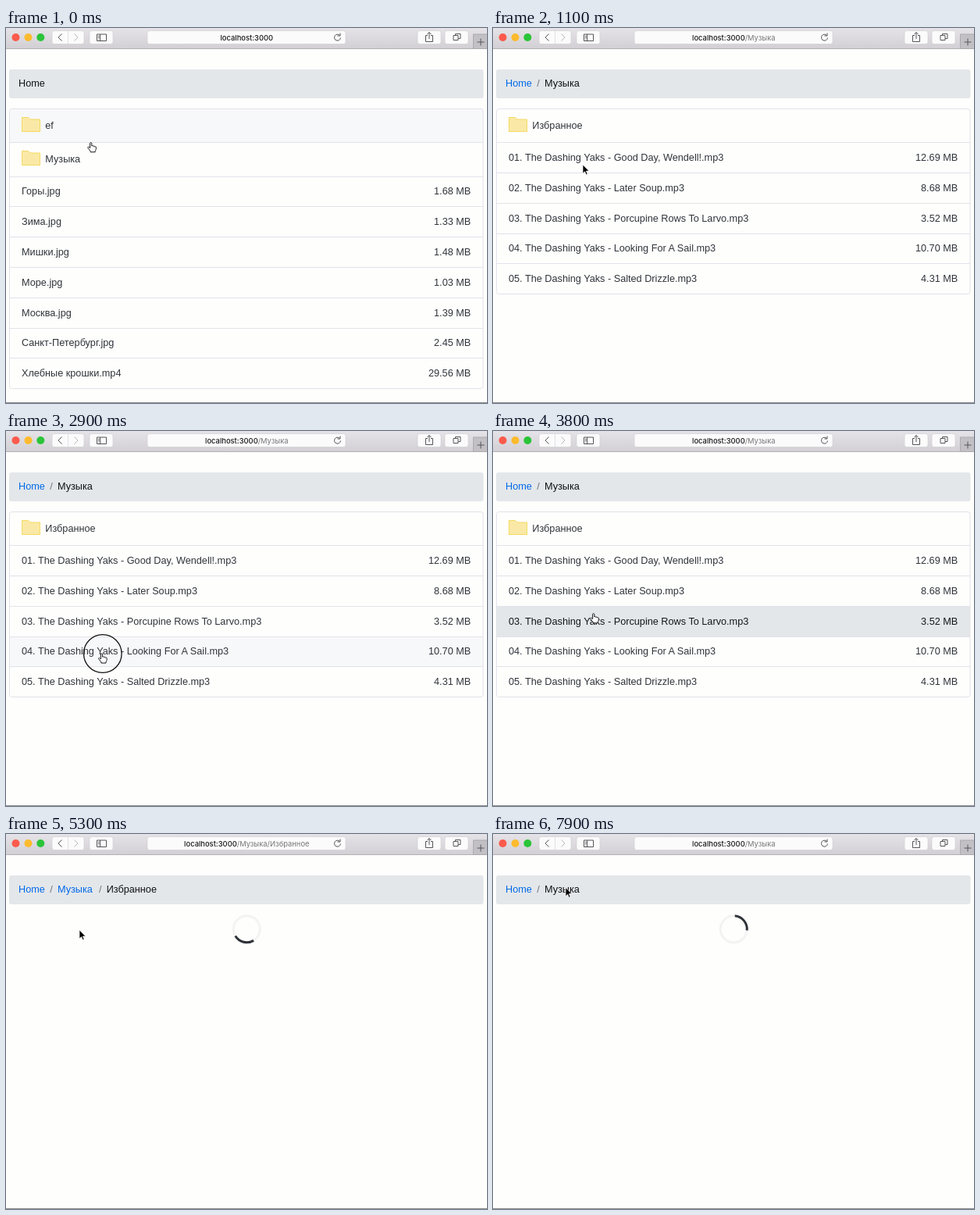
An HTML page for the animation above (8000 ms loop, 616 px wide and 480 px high).

```html
<!DOCTYPE html>
<html lang="ru">
<head>
<meta charset="utf-8">
<title>File browser</title>
<style>
  html, body { margin: 0; width: 100%; height: 100%; overflow: hidden; background: #fefefd; }
  svg { display: block; width: 616px; height: 480px; }
  text { font: 12.7px "Liberation Sans", Arial, sans-serif; fill: #30343a; white-space: pre; }
  .url { font: 500 9.4px Inter, Roboto, sans-serif; fill: #18181a; text-anchor: middle; }
  .url .path { fill: #77777a; font-weight: 400; }
  .size { text-anchor: end; }
  .link { fill: #0069e8; }
  .here { fill: #101214; }
  .slash { fill: #6c757d; }
  .active text { fill: #14171a; }
  .btn { fill: #fbfbfb; stroke: #cfcdd1; stroke-width: .6; }
  .icon { fill: none; stroke: #555558; stroke-width: 1; }
  .line { fill: none; stroke: #e2e2ea; }
  .folder { fill: #fae9a6; stroke: #f4d963; }
</style>
</head>
<body>
<svg viewBox="0 0 616 480">
  <defs>
    <linearGradient id="bar" x2="0" y2="1">
      <stop stop-color="#e5e3e7"/><stop offset="1" stop-color="#d2d0d4"/>
    </linearGradient>
  </defs>
  <rect width="616" height="480" fill="#fefefd"/>
  <rect width="616" height="26" fill="url(#bar)"/>
  <path d="M0 26.5H616" stroke="#b4b2b6"/>
  <path d="M0 479.5H616" stroke="#8b8b8d"/>
  <circle cx="12.5" cy="12" r="5" fill="#fb5a4c"/>
  <circle cx="28.5" cy="12" r="5" fill="#fcbb2e"/>
  <circle cx="44.3" cy="12" r="5" fill="#2bc438"/>
  <g class="btn">
    <rect x="59" y="3.5" width="41" height="17" rx="3"/>
    <rect x="107" y="3.5" width="30" height="17" rx="3"/>
    <rect x="181" y="3.5" width="254" height="17" rx="3"/>
    <rect x="527" y="3.5" width="30" height="17" rx="3"/>
    <rect x="562" y="3.5" width="30" height="17" rx="3"/>
    <path d="M79.5 4V20"/>
  </g>
  <g class="icon">
    <path d="M71.5 7.5l-4.5 4.5 4.5 4.5"/>
    <path d="M87.5 7.5l4.5 4.5-4.5 4.5" stroke="#b8b8ba"/>
    <path d="M116.5 8H128.5V16.5H116.5ZM120.5 8V16.5M118 10.5h1.5M118 12.5h1.5"/>
    <path d="M427.5 9.5A4 4 0 1 0 428.5 12.5M428 6.5V10H424.5"/>
    <path d="M540 9.5H537.5V17.5H546.5V9.5H544M542 14V5.5M539.5 8L542 5.5L544.5 8"/>
    <path d="M573 14.5V9.5H579V15.5H573ZM575.5 9.5V7.5H582V13.5H579"/>
  </g>
  <rect x="598.5" y="8" width="18" height="18.5" fill="#c2c0c4" stroke="#adabaf"/>
  <path d="M603.5 18H612.5M608 13.5V22.5" stroke="#555558"/>
  <rect x="4" y="53" width="607.5" height="37" rx="3" fill="#e4e7ea"/>
  <g id="pages"></g>
  <g id="spinner" fill="none" stroke-width="3">
    <circle r="17" stroke="#f3f3f3"/>
    <path d="M-12.02 -12.02A17 17 0 0 1 12.02 -12.02" stroke="#2e3338"/>
  </g>
  <circle id="ring" r="24.3" fill="none" stroke="#111" stroke-width="1.3"/>
  <path id="arrow" d="M0 0V11.2L2.6 8.8L4.3 12.7L6.1 11.9L4.4 8.1H8Z"
        fill="#000" stroke="#fff" stroke-width=".7"/>
  <path id="hand" d="M-1.4 .9C-1.4 -.6 .8 -.6 .8 .9V4.2C1.2 3.4 2.7 3.6 2.8 4.7C3.3 4 4.6 4.2 4.7 5.3C5.3 4.7 6.4 5 6.4 6.1C6.4 8.6 6.1 9.1 5.2 10.7V12H-.9V10.9C-2 9.6 -2.6 8.3 -4 6.9C-4.9 5.9 -3.5 4.9 -2.6 5.7L-1.4 6.9Z"
        fill="#fff" stroke="#151517"/>
</svg>
<script>
const LOOP = 8000, STEP = 100, FOLDER_H = 43.4, FILE_H = 38.8, TOP = 103.8;
const $ = id => document.getElementById(id);

function add(parent, tag, attrs = {}, text = '') {
  const el = document.createElementNS('http://www.w3.org/2000/svg', tag);
  for (const k in attrs) el.setAttribute(k, attrs[k]);
  el.textContent = text;
  return parent.appendChild(el);
}
const show = (el, on) => { el.style.display = on ? '' : 'none'; };

// crumbs: [x, label]
function makePage(crumbs, folders = [], files = []) {
  const root = add($('pages'), 'g'), list = add(root, 'g'), rows = [];
  const url = add(root, 'text', { class: 'url', x: 308.3, y: 15.6 });
  add(url, 'tspan', {}, 'localhost:3000');
  const path = crumbs.slice(1).map(c => '/' + c[1]).join('');
  if (path) add(url, 'tspan', { class: 'path' }, path);

  const labels = crumbs.map(([x, name], i) => {
    if (i) add(root, 'text', { class: 'slash', x: x - 9.8, y: 75 }, '/');
    const last = i === crumbs.length - 1;
    return add(root, 'text', { class: last ? 'here' : 'link', x, y: 75 }, name);
  });

  let y = TOP;
  function row(name, h, size) {
    const group = add(list, 'g');
    const bg = add(group, 'rect', { x: 4.5, y, width: 606.5, height: h });
    const base = Math.floor(y + h / 2 + 3.8);
    add(group, 'text', { x: size ? 20 : 50.3, y: base }, name);
    if (size) add(group, 'text', { class: 'size', x: 595.3, y: base }, size);
    else add(group, 'path', {
      class: 'folder',
      d: `M20.5 ${base - .5}V${base - 14.5}H28.5L31 ${base - 12}H43.5V${base + 3.5}H20.5Z`
    });
    if (y > TOP) add(group, 'path', { class: 'line', d: `M4.5 ${Math.round(y) - .5}H611` });
    rows.push({ group, bg, y, h });
    y += h;
  }
  folders.forEach(f => row(f, FOLDER_H));
  files.forEach(([f, size]) => row(f, FILE_H, size + ' MB'));
  if (rows.length) add(list, 'rect', {
    class: 'line', x: 4.5, y: 103.5, width: 606.5, height: Math.round(y - TOP), rx: 3
  });
  return { root, list, rows, labels };
}

const band = 'The Dashing Yaks - ';
const home = makePage([[16, 'Home']], ['ef', 'Музыка'], [
  ['Горы.jpg', '1.68'], ['Зима.jpg', '1.33'], ['Мишки.jpg', '1.48'], ['Море.jpg', '1.03'],
  ['Москва.jpg', '1.39'], ['Санкт-Петербург.jpg', '2.45'], ['Хлебные крошки.mp4', '29.56']
]);
const music = makePage([[16, 'Home'], [66, 'Музыка']], ['Избранное'], [
  ['Good Day, Wendell!', '12.69'], ['Later Soup', '8.68'], ['Porcupine Rows To Larvo', '3.52'],
  ['Looking For A Sail', '10.70'], ['Salted Drizzle', '4.31']
].map(([song, size], i) => [`0${i + 1}. ${band}${song}.mp3`, size]));
const faves = makePage([[16, 'Home'], [66, 'Музыка'], [128.7, 'Избранное']]);
const pages = [home, music, faves];

// [start, page, loading]
const scenes = [
  [0, home, false], [600, music, true], [1000, music, false],
  [5300, faves, true], [5700, faves, false], [7600, music, true]
];
// [time, x, y] of the pointer tip
const track = [
  [0, 109, 146.8], [300, 113, 168], [600, 113, 171], [1000, 115, 175], [1100, 115, 175],
  [1900, 118, 222], [2600, 122.8, 285], [3100, 122.8, 285], [3500, 129, 233.8],
  [3900, 129, 233.8], [4600, 93.5, 142], [5000, 94, 117], [5500, 94, 126], [6000, 94, 126],
  [6100, 90, 137], [6300, 88, 93], [6800, 92, 70], [7000, 92, 70], [7300, 93, 68.5], [8000, 93, 68.5]
];
const presses = [[400, 600], [2800, 3000], [3600, 3700], [5100, 5300], [7500, 7600]];
const actives = [[500, 600], [3000, 3200], [3700, 3900], [5200, 5300]];
const arrows = [[600, 1200], [5300, 6700], [7600, 8000]];
const within = (spans, t) => spans.some(([a, b]) => t >= a && t < b);

function pointer(t) {
  const i = track.findIndex(k => k[0] > t), [t0, x0, y0] = track[i - 1], [t1, x1, y1] = track[i];
  const u = (t - t0) / (t1 - t0), e = u * u * (3 - 2 * u);
  return [x0 + (x1 - x0) * e, y0 + (y1 - y0) * e];
}

function draw(t) {
  const [, page, loading] = scenes.filter(s => s[0] <= t).pop();
  const [x, y] = pointer(t), arrow = within(arrows, t), active = within(actives, t);

  pages.forEach(p => show(p.root, p === page));
  show(page.list, !loading);
  for (const r of page.rows) {
    const over = !arrow && y >= r.y && y < r.y + r.h;
    r.bg.style.fill = over ? (active ? '#e4e7ea' : '#f7f8fa') : 'none';
    r.group.setAttribute('class', over && active ? 'active' : '');
  }
  faves.labels[1].style.textDecoration = arrow ? 'none' : 'underline';

  show($('spinner'), loading);
  $('spinner').setAttribute('transform', `translate(308.3 121.8) rotate(${(t * .36 + 86) % 360})`);
  show($('ring'), within(presses, t));
  $('ring').setAttribute('transform', `translate(${x + 1} ${y})`);
  show($('arrow'), arrow);
  show($('hand'), !arrow);
  $(arrow ? 'arrow' : 'hand').setAttribute('transform', `translate(${x} ${y})`);
}

const start = performance.now();
function tick(now) {
  const t = Math.max(0, now - start) % LOOP;
  draw(Math.floor(t / STEP) * STEP);
  requestAnimationFrame(tick);
}
draw(0);
requestAnimationFrame(tick);
</script>
</body>
</html>
```
